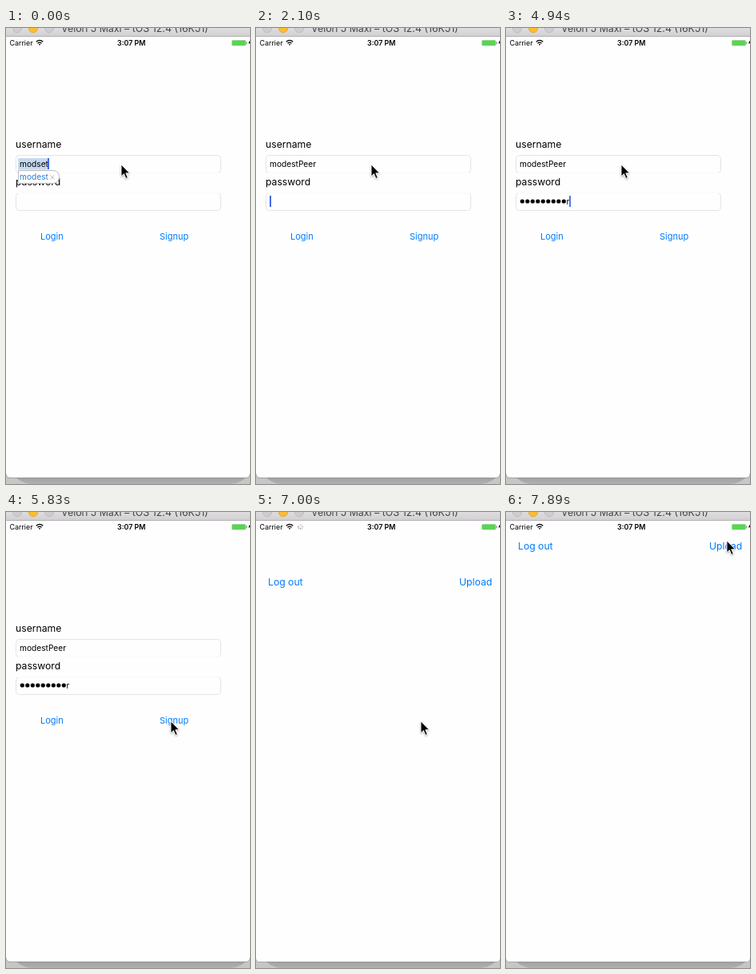
Recreate the animation shown at these times as an HTML page. Size 305 by 571 pixels, loop 8 s.

```html
<!DOCTYPE html>
<html lang="en">
<head>
<meta charset="utf-8">
<title>Sign up</title>
<style>
  html, body { margin: 0; width: 100%; height: 100%; overflow: hidden; }
  svg { display: block; width: 305px; height: 571px; font-family: Inter, "Liberation Sans", sans-serif; }
  text { white-space: pre; }
  .label { font-size: 12.2px; }
  .value { font-size: 10.2px; }
  .small { font-size: 8.9px; }
  .link { fill: #007aff; }
  .button { font-size: 11px; }
  .caret { fill: #416be6; }
</style>
</head>
<body>
<svg viewBox="0 0 305 571">
  <defs>
    <linearGradient id="bar" x2="0" y2="1">
      <stop stop-color="#dfdddf"/><stop offset="1" stop-color="#d1cfd1"/>
    </linearGradient>
    <linearGradient id="shade" x2="0" y2="1">
      <stop stop-color="#9c9c9c"/><stop offset="1" stop-color="#b0b0b0"/>
    </linearGradient>
    <clipPath id="screen"><path d="M0 11H305V558Q305 563 300 563H5Q0 563 0 558Z"/></clipPath>
    <filter id="drop" x="-50%" y="-50%" width="200%" height="200%">
      <feDropShadow dx="0" dy="1" stdDeviation=".8" flood-opacity=".35"/>
    </filter>
  </defs>

  <rect width="305" height="571" fill="#c6c6c6"/>
  <path d="M10 560H302Q296 569 282 571H30Q17 569 10 560Z" fill="url(#shade)"/>
  <path d="M0 0H305V558Q305 563 300 563H5Q0 563 0 558Z" fill="#fefefe"/>
  <path d="M0 558Q0 563.3 5 563.3H300Q305 563.3 305 558" fill="none" stroke="#8f8f8f" stroke-width=".7"/>
  <rect width="305" height="10.5" fill="url(#bar)"/>
  <path d="M0 10.5H305" stroke="#b4b2b4"/>
  <g stroke-width=".8">
    <circle cx="14" r="5.7" fill="#cfcdcf" stroke="#b9b7b9"/>
    <circle cx="34" r="5.7" fill="#fdbd2f" stroke="#e0a02a"/>
    <circle cx="54" r="5.7" fill="#cfcdcf" stroke="#b9b7b9"/>
  </g>
  <text x="69" y="5" font-size="12.4" fill="#444">Velori 5 Maxi – tOS 12.4 (16K51)</text>

  <g clip-path="url(#screen)">
    <text class="label" x="12" y="150">username</text>
    <text class="label" x="12" y="197">password</text>
    <g fill="none" stroke="#e4e4e4">
      <rect x="12.5" y="159.5" width="256" height="22" rx="4"/>
      <rect x="12.5" y="206.5" width="256" height="22" rx="4"/>
    </g>
    <path d="M14 181.5H267M14 206.5H267" stroke="#fafafa"/>
    <g id="correction">
      <rect x="15" y="163" width="37" height="14.5" fill="#c6d9f1"/>
      <path d="M15.5 178.5H59Q66.5 179 66.5 186.5Q66.5 194 59 194.5H15.5Z" fill="#fff" stroke="#bdbdbd"/>
      <text class="value" x="17" y="190" fill="#287fd6">modest</text>
      <path d="M55.3 184.3l5 5m0-5l-5 5" stroke="#bbb"/>
    </g>
    <text id="name" class="value" x="17" y="174"></text>
    <g id="dots"></g>
    <text id="last" class="value" y="220.5"></text>
    <rect id="caret" class="caret" width="2" height="14"/>
    <text class="link button" x="43" y="265">Login</text>
    <text id="signup" class="link button" x="192" y="265">Signup</text>

    <g id="sheet">
      <rect y="11" width="305" height="560" fill="#fefefe"/>
      <text class="link label" x="15" y="47">Log out</text>
      <text class="link label" x="254" y="47">Upload</text>
    </g>

    <text class="small" x="4.5" y="22">Carrier</text>
    <g fill="none" stroke="#000" stroke-width="1.3">
      <path d="M37.7 17.3Q42 13.5 46.3 17.3M39.5 19.2Q42 17 44.5 19.2"/>
      <path d="M42 22l-1.2-1.5q1.2-1 2.4 0z" fill="#000" stroke="none"/>
    </g>
    <g id="spinner" stroke="#777" stroke-width=".9"></g>
    <text class="small" x="139" y="22" font-weight="600">3:07 PM</text>
    <rect x="282.5" y="15.5" width="17" height="6.5" rx="1" fill="#58d552" stroke="#8dc98a" stroke-width=".6"/>
    <path d="M300.8 17.3v3" stroke="#777"/>
    <path d="M305 15.5l-2 3.8h2z"/>
  </g>

  <path id="pointer" d="M0 0V14.8L3.4 11.6L5.9 17.4L8.3 16.4L5.8 10.8H10.5Z" stroke="#fff" stroke-width=".9" filter="url(#drop)"/>
</svg>
<script>
const LOOP = 8000, PITCH = 6.5;
const $ = id => document.getElementById(id);

// Each track: [start ms, value], held until the next entry.
const nameTrack = [[0, "modset"], [450, "mods"], [600, "mod"], [750, "mode"], [900, "modes"],
  [1050, "modest"], [1500, "modestP"], [1650, "modestPe"], [1800, "modestPeer"]];
// Value: hidden character count, then the character still in clear.
const secretTrack = [[0, 0, ""], [2550, 1, "o"], [2700, 2, "d"], [3150, 3, "e"], [3440, 4, "s"],
  [4040, 5, "t"], [4490, 6, "P"], [4790, 7, "e"], [4940, 9, "r"], [6400, 10, ""]];
const caretTrack = [[0, 1], [3590, .5], [3740, .9], [5390, .5], [5540, 0]];
const pressTrack = [[0, 1], [5970, .3], [6110, .3], [6260, .75], [6400, 1]];
const sheetTrack = [[0, 571], [6550, 319], [6700, 148], [6850, 76], [7000, 45],
  [7140, 22], [7290, 9], [7440, 2], [7590, 0]];
const pointerTrack = [[0, 144, 171], [5390, 157, 194], [5540, 186, 238], [5690, 203, 259],
  [5830, 206, 262], [7290, 218, 222], [7440, 252, 108], [7590, 274, 34], [7740, 275, 27], [7890, 276, 36]];

const at = (track, t) => track.findLast(step => step[0] <= t).slice(1);

function add(parent, tag, attrs) {
  const el = document.createElementNS("http://www.w3.org/2000/svg", tag);
  for (const key in attrs) el.setAttribute(key, attrs[key]);
  return parent.appendChild(el);
}

const dots = Array.from({ length: 10 }, (_, i) =>
  add($("dots"), "circle", { cx: 20.3 + i * PITCH, cy: 217, r: 2.6 }));
const ticks = Array.from({ length: 8 }, (_, i) =>
  add($("spinner"), "path", { d: "M0-1.7V-3.6", transform: `translate(55.5 18.6) rotate(${i * 45})` }));

const show = (el, on) => el.setAttribute("visibility", on ? "visible" : "hidden");

function draw(t) {
  const [name] = at(nameTrack, t);
  const [hidden, clear] = at(secretTrack, t);
  const [x, y] = at(pointerTrack, t);
  const last = $("last"), inSecret = t >= 2100;

  $("name").textContent = name;
  last.textContent = clear;
  last.setAttribute("x", 17 + hidden * PITCH);
  dots.forEach((dot, i) => show(dot, i < hidden));
  show($("correction"), t < 150);

  const end = inSecret
    ? 17 + hidden * PITCH + last.getComputedTextLength()
    : 17 + $("name").getComputedTextLength();
  $("caret").setAttribute("x", Math.floor(end));
  $("caret").setAttribute("y", inSecret ? 210 : 163);
  $("caret").setAttribute("opacity", at(caretTrack, t)[0]);

  $("signup").setAttribute("opacity", at(pressTrack, t)[0]);
  $("sheet").setAttribute("transform", `translate(0 ${at(sheetTrack, t)[0]})`);
  $("pointer").setAttribute("transform", `translate(${x} ${y})`);

  show($("spinner"), t >= 6400 && t < 7440);
  const turn = Math.floor(t / 150);
  ticks.forEach((tick, i) => tick.setAttribute("opacity", 1 - ((turn - i + 80) % 8) * .09));
}

const start = performance.now();
function frame() {
  draw((performance.now() - start) % LOOP);
  requestAnimationFrame(frame);
}
frame();
</script>
</body>
</html>
```
